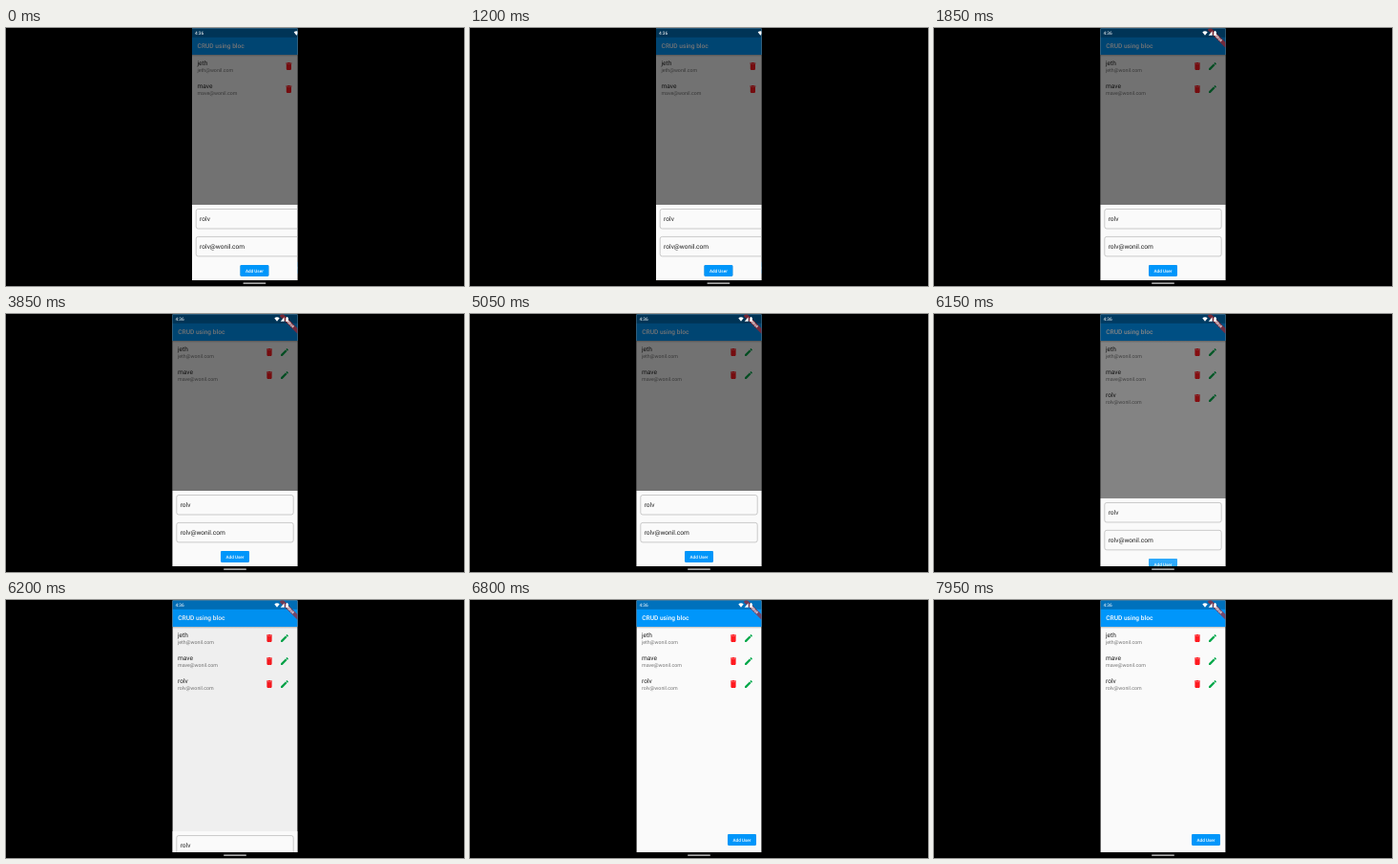
Write an HTML page that moves like this. It is 480 px wide and 270 px high and loops after 8000 ms.

```html
<!DOCTYPE html>
<html lang="en">
<head>
<meta charset="utf-8">
<title>CRUD using bloc</title>
<style>
  html, body { margin: 0; width: 100%; height: 100%; overflow: hidden; background: #000; }
  svg { display: block; width: 480px; height: 270px; }
  text { font: 6.62px Roboto, sans-serif; text-rendering: geometricPrecision; fill: #212121; }
  .title { font-weight: 500; fill: #fff; }
  .mail { font-size: 5.3px; fill: #777; }
  .label { font-size: 4.64px; font-weight: 500; fill: #fff; text-anchor: middle; }
  .clock { font-size: 4.8px; fill: #fff; }
  .debug { font-size: 3.38px; font-weight: 900; fill: #fff; text-anchor: middle; }
  .field { fill: none; stroke: #aaa; stroke-width: .6; }
  .blue { fill: #0096fa; }
  .button { filter: drop-shadow(0 .4px .4px rgba(0, 0, 0, .3)); }
</style>
</head>
<body>
<svg viewBox="0 0 480 270">
  <defs>
    <clipPath id="window"><rect x="174.6" width="130.8" height="270"/></clipPath>
    <clipPath id="screen"><rect x="174.6" y=".5" width="130.8" height="263.6"/></clipPath>
    <linearGradient id="shade" x2="0" y2="1">
      <stop stop-opacity=".25"/><stop offset="1" stop-opacity="0"/>
    </linearGradient>
    <path id="trash" d="M6 19c0 1.1.9 2 2 2h8c1.1 0 2-.9 2-2V7H6v12zM19 4h-3.5l-1-1h-5l-1 1H5v2h14V4z"/>
    <path id="pencil" d="M3 17.25V21h3.75L17.81 9.94l-3.75-3.75L3 17.25zM20.71 7.04c.39-.39.39-1.02 0-1.41l-2.34-2.34c-.39-.39-1.02-.39-1.41 0l-1.83 1.83 3.75 3.75 1.83-1.83z"/>
  </defs>
  <g clip-path="url(#window)">
    <g id="phone">
      <g clip-path="url(#screen)">
        <rect x="174" width="132" height="265" fill="#fafafa"/>
        <rect x="174" y="28" width="132" height="2" fill="url(#shade)"/>
        <rect class="blue" x="174" width="132" height="28"/>
        <rect x="174" width="132" height="9.8" fill-opacity=".25"/>
        <text class="title" x="180.2" y="21.3">CRUD using bloc</text>
        <g id="rows"></g>
        <rect class="blue button" x="270" y="245" width="30" height="12" rx="1.4"/>
        <text class="label" x="285" y="252.7">Add User</text>
        <rect id="scrim" x="174" width="132" height="265"/>
        <g id="sheet">
          <rect x="174" y="185" width="132" height="80" fill="#fafafa"/>
          <rect class="field" x="178.8" y="189.5" width="122.4" height="20.5" rx="2.2"/>
          <text x="182.7" y="202">rolv</text>
          <rect class="field" x="178.8" y="218.4" width="122.4" height="20.5" rx="2.2"/>
          <text x="182.7" y="231">rolv@wonil.com</text>
          <rect class="blue button" x="225" y="248" width="30" height="12" rx="1.4"/>
          <rect id="ripple" x="225" y="248" width="30" height="12" rx="1.4" fill="#fff"/>
          <text class="label" x="240" y="255.7">Add User</text>
        </g>
        <g transform="translate(305.5 2) rotate(45)">
          <rect x="-13.3" y="9.27" width="26.6" height="3.97" fill="#b71c1c" fill-opacity=".63"/>
          <text class="debug" y="12.45">DEBUG</text>
        </g>
        <text class="clock" x="177.5" y="7.1">4:36</text>
        <g fill="#fff">
          <path d="M281.3 4.3q2.7-2.2 5.4 0L284 7.8z"/>
          <path d="M287.7 7.7h4v-4.4z"/>
          <path d="M293.3 3.7h.8v-.6h1v.6h.8v4.1h-2.6z"/>
        </g>
      </g>
      <rect x="228" y="266.4" width="24" height="1.3" rx=".65" fill="#ddd"/>
    </g>
  </g>
</svg>
<script>
const LOOP = 8000, SHEET_HEIGHT = 79.5;
const byId = id => document.getElementById(id);
const clamp = v => Math.min(1, Math.max(0, v));
const progress = (t, start, end) => clamp((t - start) / (end - start));

// Cubic bezier easing, solved for x by bisection
const bezier = (x1, y1, x2, y2) => x => {
  const at = (s, a, b) => 3 * (1 - s) ** 2 * s * a + 3 * (1 - s) * s * s * b + s ** 3;
  let low = 0, high = 1;
  for (let i = 0; i < 24; i++) {
    const mid = (low + high) / 2;
    if (at(mid, x1, x2) < x) low = mid; else high = mid;
  }
  return at(low, y1, y2);
};
const ease = bezier(.25, .1, .25, 1);
const decelerate = bezier(0, 0, .2, 1);

const icon = (name, x, y, color) =>
  `<use href="#${name}" fill="${color}" transform="translate(${x} ${y}) scale(.435) translate(-12 -12)"/>`;

byId('rows').innerHTML = ['jeth', 'mave', 'rolv'].map((name, i) => `
  <g transform="translate(0 ${i * 24})">
    <text x="180" y="38.8">${name}</text>
    <text class="mail" x="180" y="45.5">${name}@wonil.com</text>
    ${icon('trash', 276, 40, '#ff1a20')}${icon('pencil', 292, 40, '#00a84a')}
  </g>`).join('');

const newRow = byId('rows').lastElementChild;

function draw(t) {
  const shift = 20.4 * (1 - progress(t, 1600, 1850)) ** 3;
  byId('phone').setAttribute('transform', `translate(${shift} 0)`);
  newRow.setAttribute('visibility', t < 6050 ? 'hidden' : 'visible');

  const open = 1 - progress(t, 6111, 6210);
  byId('scrim').setAttribute('opacity', .54 * ease(open));
  byId('sheet').setAttribute('transform', `translate(0 ${SHEET_HEIGHT * (1 - decelerate(open))})`);
  byId('ripple').setAttribute('opacity', .18 * progress(t, 6080, 6150));
}

function tick() {
  draw(performance.now() % LOOP);
  requestAnimationFrame(tick);
}
tick();
</script>
</body>
</html>
```
